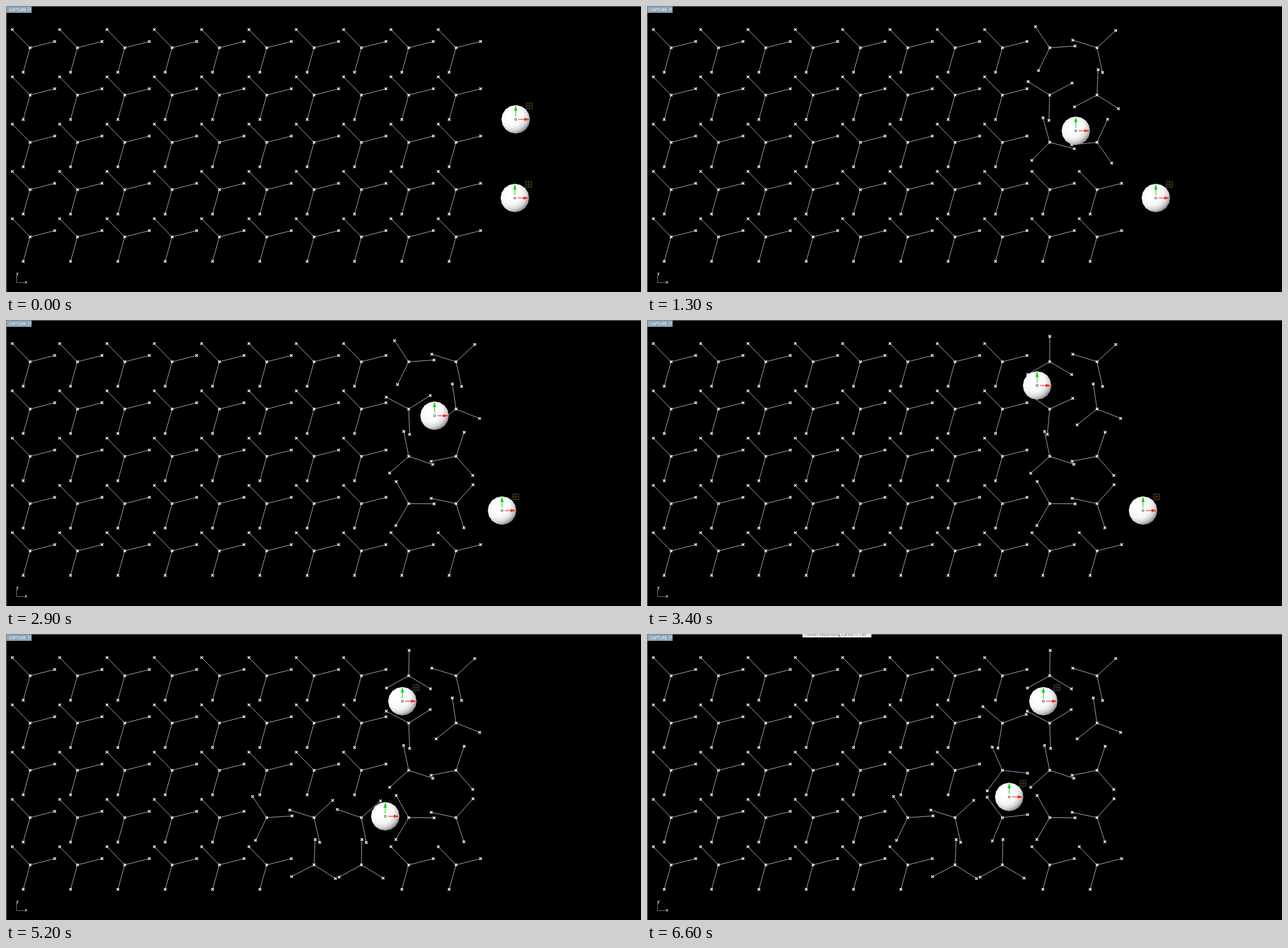
Write an HTML page with a canvas that moves like this. It is 1115 px wide and 502 px high and loops after 6700 ms.

```html
<!DOCTYPE html>
<html>
<head>
<meta charset="utf-8">
<style>
  html, body { margin: 0; width: 100%; height: 100%; overflow: hidden; background: #000; }
  canvas { display: block; }
</style>
</head>
<body>
<canvas id="stage" width="1115" height="502"></canvas>
<script>
const ctx = document.getElementById('stage').getContext('2d');
const LOOP = 6700, STEP = 100, TURN_TIME = 500;
const COLS = 10, ROWS = 5, ARM = 44.6, REST = -14.3, RADIUS = 25;
const turns = {};

// A ball turns the first rotor; each next one meshes with the one before,
// turning the other way, and less the smaller the turn.
function push(start, degrees, ...rotors) {
  for (const name of rotors) {
    (turns[name] ||= []).push({ start, degrees });
    degrees *= -Math.abs(degrees) / 77;
  }
}

push(550, 46.7, '9,1', '9,0', '8,0');
push(900, -57, '9,2');
push(950, 37, '8,2', '8,1');
push(1700, -33.7, '9,3', '8,3');
push(2450, -10.9, '9,1');
push(2500, -4.4, '8,2');
push(2950, 35, '8,0');
push(2975, -120, '8,1');
push(4300, 45.5, '7,4', '7,3');
push(4450, 46.8, '6,4', '6,3', '5,3');
push(5500, 34.5, '7,3');
push(5800, 20.8, '7,2', '7,1');

// Way points: time, x, y
const upperBall = [
  [100, 895, 199], [800, 782, 203], [1300, 753, 219], [1400, 757, 216],
  [2700, 757, 216], [3100, 748, 120], [3400, 685, 115], [3700, 696, 118]
];
const lowerBall = [
  [1600, 893.5, 337], [2300, 838, 308], [2600, 871, 334.5], [3600, 871, 334.5],
  [4000, 790, 476], [4300, 648, 455.5], [4700, 520, 455], [5000, 672, 395],
  [5200, 666, 320], [5600, 684, 262], [6300, 636, 286]
];

function smooth(f) {
  f = Math.min(1, Math.max(0, f));
  return f * f * (3 - 2 * f);
}

function rotorAngle(name, t) {
  return (turns[name] || []).reduce(
    (sum, turn) => sum + turn.degrees * smooth((t - turn.start) / TURN_TIME), REST);
}

function pointAt(path, t) {
  const next = path.findIndex(point => point[0] > t);
  if (next === 0) return path[0].slice(1);
  if (next < 0) return path[path.length - 1].slice(1);
  const [t0, x0, y0] = path[next - 1], [t1, x1, y1] = path[next];
  const f = (t - t0) / (t1 - t0);
  return [x0 + (x1 - x0) * f, y0 + (y1 - y0) * f];
}

function line(color, width, ...points) {
  ctx.strokeStyle = color;
  ctx.lineWidth = width;
  ctx.beginPath();
  points.forEach(([x, y]) => ctx.lineTo(x, y));
  ctx.stroke();
}

function polygon(color, ...points) {
  ctx.fillStyle = color;
  ctx.beginPath();
  points.forEach(([x, y]) => ctx.lineTo(x, y));
  ctx.fill();
}

function rect(color, x, y, w, h) {
  ctx.fillStyle = color;
  ctx.fillRect(x, y, w, h);
}

function text(str, x, y, font, color) {
  ctx.font = font + ' "Open Sans", sans-serif';
  ctx.fillStyle = color;
  ctx.fillText(str, x, y);
}

function polar(radius, angle) {
  return [radius * Math.cos(angle), radius * Math.sin(angle)];
}

function cross(x, y) {
  line('#fff', 1.5, [x - 2.2, y - 2.2], [x + 2.2, y + 2.2]);
  line('#fff', 1.5, [x - 2.2, y + 2.2], [x + 2.2, y - 2.2]);
}

function rotor(col, row, t) {
  ctx.save();
  ctx.translate(42.3 + col * 83.1, 73.3 + row * 83);
  const angle = rotorAngle(col + ',' + row, t);
  for (let k = 0; k < 3; k++) {
    const tip = polar(ARM, (angle + k * 120) * Math.PI / 180);
    line('#b4b4b4', 1, [0, 0], tip);
    cross(...tip);
  }
  cross(0, 0);
  ctx.restore();
}

function arrow(color, angle) {
  ctx.save();
  ctx.rotate(angle);
  line(color, 1.2, [5, 0], [17, 0]);
  polygon(color, [25, 0], [15, -2.8], [15, 2.8]);
  ctx.restore();
}

function ball(path, t) {
  const [x, y] = pointAt(path, t), [lastX, lastY] = pointAt(path, t - STEP);
  ctx.save();
  ctx.translate(x, y);
  const shade = ctx.createRadialGradient(-7, -8, 8, -7, -8, 36);
  shade.addColorStop(0, '#fff');
  shade.addColorStop(0.45, '#f6f6f6');
  shade.addColorStop(0.72, '#d4d4d4');
  shade.addColorStop(1, '#7c7c7c');
  polygon(shade, ...Array.from({ length: 16 }, (_, k) => polar(RADIUS, k * Math.PI / 8)));
  arrow('#10d418', -Math.PI / 2);
  arrow('#f03020', 0);
  ctx.lineWidth = 1;
  ctx.strokeStyle = '#666';
  ctx.strokeRect(-1.5, -1.5, 3, 3);
  // The plane handle shows only while the ball rests
  if (x === lastX && y === lastY) {
    ctx.strokeStyle = '#4c5a1c';
    ctx.strokeRect(19, -29, 10, 10);
    line('#743418', 1, [24, -29], [24, -19]);
    line('#743418', 1, [19, -24], [29, -24]);
  }
  ctx.restore();
}

function viewport() {
  rect('#85835a', 0, 0, 1115, 1);
  rect('#85835a', 0, 0, 1, 502);
  rect('#8ea5bd', 1, 1, 44, 11);
  rect('#c4d0dc', 39, 2, 1, 9);
  text('CAPTURE', 5, 9, '7px', '#fff');
  polygon('#fff', [41, 5], [44, 5], [42.5, 7]);
  line('#777', 1, [18.5, 473], [18.5, 485.5], [33, 485.5]);
  text('y', 18, 472, 'bold 7px', '#ddd');
  text('x', 33, 487, 'bold 7px', '#ddd');
}

function tooltip() {
  rect('#f4f4f4', 273, 0, 121, 6);
  text('Finish recording (Shift+F10)', 277, 3, '8.5px', '#444');
}

function draw(now) {
  const t = Math.floor(now % LOOP / STEP) * STEP;
  rect('#000', 0, 0, 1115, 502);
  for (let row = 0; row < ROWS; row++)
    for (let col = 0; col < COLS; col++) rotor(col, row, t);
  ball(upperBall, t);
  ball(lowerBall, t);
  viewport();
  if (t >= 6500) tooltip();
  requestAnimationFrame(draw);
}
requestAnimationFrame(draw);
</script>
</body>
</html>
```
